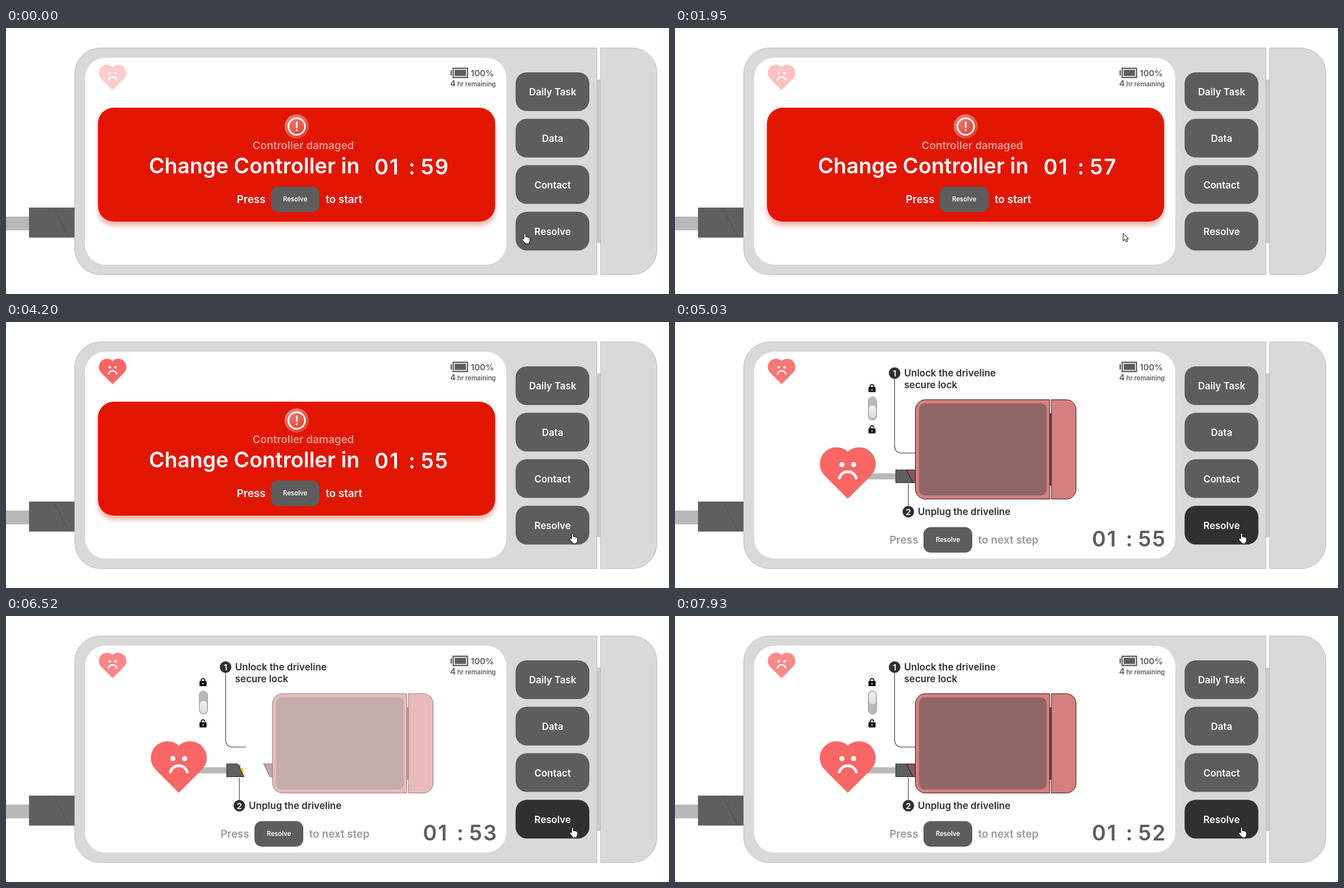
An HTML page that plays this animation: 1182x474 px, repeating every 7.99 s.

```html
<!DOCTYPE html>
<html lang="en">
<head>
<meta charset="utf-8">
<title>Controller alert</title>
<style>
html, body { margin: 0; width: 100%; height: 100%; overflow: hidden; background: #fff; }
svg { display: block; width: 1182px; height: 474px; font-family: Inter, "Liberation Sans", sans-serif; font-weight: 600; }
.mid { text-anchor: middle; }
.s11 { font-size: 11.3px; }
.s15 { font-size: 15.1px; }
.s17 { font-size: 17px; }
.s19 { font-size: 18.9px; }
.s38 { font-size: 37.8px; }
.clock text { font-size: 37.8px; letter-spacing: 1.9px; }
.white { fill: #fff; }
.gray { fill: #5d5d5d; }
.soft { fill: #9a9a9a; }
.ink { fill: #2f2f2f; }
.body { fill: #d9d9d9; stroke: #bcbcbc; }
.line { fill: none; stroke: #333; stroke-width: 1.1; }
.case { fill: #d67f7f; stroke: #231818; }
</style>
</head>
<body>
<svg viewBox="0 0 1182 474">
  <defs>
    <filter id="shadow" x="-5%" y="-10%" width="110%" height="125%">
      <feDropShadow dx="0" dy="7" stdDeviation="4" flood-color="#e11900" flood-opacity=".35"/>
    </filter>
    <linearGradient id="glow" x1="0" y1="0" x2=".8" y2="1">
      <stop offset="0" stop-color="#fff" stop-opacity=".5"/>
      <stop offset="1" stop-color="#fff" stop-opacity=".15"/>
    </linearGradient>
    <linearGradient id="knobFill" x1="0" y1="0" x2="0" y2="1">
      <stop offset="0" stop-color="#f1f1f1"/>
      <stop offset="1" stop-color="#dedede"/>
    </linearGradient>
    <g id="face">
      <path d="M0 91L-40.3 50.7A29.7 29.7 0 0 1 0 7A29.7 29.7 0 0 1 40.3 50.7Z" fill="#f96666"/>
      <circle cx="-10.5" cy="30" r="4.6" fill="#fff"/>
      <circle cx="10.5" cy="30" r="4.6" fill="#fff"/>
      <path d="M-15 54C-10 39 10 39 15 54" fill="none" stroke="#fff" stroke-width="5" stroke-linecap="round"/>
    </g>
    <g id="pill">
      <rect width="87" height="45.5" rx="13" fill="#5d5d5d"/>
      <text class="mid white s11" x="43.5" y="26.5">Resolve</text>
    </g>
  </defs>

  <rect y="336" width="42" height="24.5" fill="#b8b8b8"/>
  <rect x="41" y="320" width="83" height="53.5" fill="#5f5f5f"/>
  <path d="M85 320L112 373.5" stroke="#505050"/>
  <rect x="1053" y="92.500" width="7" height="290" fill="#cbcbcb" stroke="#bcbcbc"/>
  <path class="body" d="M1053.500 35.500H168.500A46 46 0 0 0 122.500 81.500V393.500A46 46 0 0 0 168.500 439.500H1053.500Z"/>
  <path class="body" d="M1060 35.500H1116A44.500 44.500 0 0 1 1160.500 80V395A44.500 44.500 0 0 1 1116 439.500H1060Z"/>
  <rect x="141" y="53" width="751" height="368.500" rx="36" fill="#fff"/>

  <g id="buttons"></g>

  <g class="gray">
    <rect x="792.500" y="75.500" width="2.500" height="9"/>
    <rect x="797.300" y="71.800" width="25.400" height="16.400" fill="none" stroke="#5d5d5d" stroke-width="2.300"/>
    <rect x="800" y="74.500" width="20" height="11"/>
    <text class="s15" x="828.500" y="85.500">100%</text>
    <text class="s15" x="791.800" y="103.500">4</text>
    <text class="s11" x="804.500" y="103.500">hr remaining</text>
  </g>

  <use id="pulse" href="#face" transform="translate(190 66) scale(.492)"/>

  <g id="alert">
    <rect x="164" y="142" width="708" height="203" rx="28" fill="#e11900" filter="url(#shadow)"/>
    <circle cx="518.300" cy="175.500" r="21.700" fill="url(#glow)"/>
    <circle cx="518.300" cy="175.500" r="14.800" fill="none" stroke="#fff" stroke-width="3"/>
    <path d="M518.300 168V177" stroke="#fff" stroke-width="3" stroke-linecap="round"/>
    <circle cx="518.300" cy="182" r="1.800" fill="#fff"/>
    <g class="white">
      <text class="mid s19" x="530" y="216" opacity=".58">Controller damaged</text>
      <text class="mid s38" x="442.500" y="259">Change Controller in</text>
      <g class="clock" id="clock1"></g>
      <text class="mid s19" x="437" y="312">Press</text>
      <text class="mid s19" x="602.500" y="312">to start</text>
    </g>
    <use href="#pill" x="472" y="282.500"/>
  </g>

  <g id="guide">
    <rect x="343" y="269.500" width="51" height="11" fill="#b8b8b8"/>
    <use href="#face" transform="translate(308 224)"/>
    <rect x="412" y="265" width="6" height="18" fill="#8b8b8b"/>
    <rect x="416" y="271" width="7" height="10" fill="#ffc800"/>
    <path d="M393.500 263.500H413L424.500 286.500H393.500Z" fill="#5f5f5f" stroke="#333"/>
    <path class="line" d="M391.500 100V219Q391.500 233.500 404 233.500H428M416 288.500V330"/>
    <g id="device">
      <path d="M412.500 263.500H428.500V286.500H424Z" fill="#85595a" stroke="#231818"/>
      <rect x="668.500" y="163.500" width="2.500" height="127.500" fill="#a86262" stroke="#231818"/>
      <path class="case" d="M668 138.500H446.500A18 18 0 0 0 428.500 156.500V297.500A18 18 0 0 0 446.500 315.500H668Z"/>
      <path class="case" d="M671 138.500H697.500A17.500 17.500 0 0 1 715 156V298A17.500 17.500 0 0 1 697.500 315.500H671Z"/>
      <rect x="435" y="145" width="227.500" height="164" rx="10" fill="#8f6666"/>
    </g>
    <g class="ink">
      <circle cx="391.500" cy="91" r="10.300"/>
      <circle cx="416" cy="338" r="10.300"/>
      <text class="s17" x="408.500" y="97">Unlock the driveline</text>
      <text class="s17" x="408.500" y="117.500">secure lock</text>
      <text class="s17" x="433" y="343.500">Unplug the driveline</text>
    </g>
    <g class="mid white s15">
      <text x="391.500" y="96.500">1</text>
      <text x="416" y="343.500">2</text>
    </g>
    <g id="locks"></g>
    <rect x="344.500" y="133.500" width="15" height="41.500" rx="7.500" fill="#b9b9b9" stroke="#a2a2a2"/>
    <rect id="knob" x="345.200" y="134.500" width="13.600" height="23.500" rx="6.800" fill="url(#knobFill)" stroke="#aaa" stroke-width=".8"/>
    <g class="soft">
      <text class="mid s19" x="408" y="395">Press</text>
      <text class="mid s19" x="594.300" y="395">to next step</text>
    </g>
    <use href="#pill" x="443" y="365.500"/>
    <g class="clock gray" id="clock2"></g>
  </g>

  <g id="cursor" stroke="#000" fill="#fff" stroke-linejoin="round">
    <path id="arrow" d="M0 .5V14L3.300 11 5.700 16 8 15 5.700 10.200H9.500Z"/>
    <path id="hand" d="M-1.600 10V1.600Q-1.600 0 0 0T1.600 1.600V6.200Q3.300 5.200 4.300 6.800Q6 6 6.800 7.600Q9 7.200 9 9.500V12.500Q9 15 7.500 16.500V18.500H.2V17Q-2.500 14.500-5 10.800Q-5 8.800-3.300 9Z"/>
  </g>
</svg>
<script>
const LOOP = 7990;
const NS = "http://www.w3.org/2000/svg";
const $ = id => document.getElementById(id);

function add(parent, tag, attrs, text) {
  const el = document.createElementNS(NS, tag);
  for (const k in attrs) el.setAttribute(k, attrs[k]);
  if (text) el.textContent = text;
  parent.appendChild(el);
  return el;
}

const buttons = ["Daily Task", "Data", "Contact", "Resolve"].map((label, i) => {
  const y = 79 + i * 82.8;
  const box = add($("buttons"), "rect", { x: 908.5, y, width: 131.5, height: 69, rx: 20, fill: "#5d5d5d" });
  add($("buttons"), "text", { class: "mid white s17", x: 974.5, y: y + 41.3 }, label);
  return box;
});

// Closed lock above the switch, open lock below
[[111, 0], [184.5, 1]].forEach(([y, open]) => {
  const g = add($("locks"), "g", { transform: `translate(345 ${y})` });
  add(g, "rect", { x: 0, y: 5, width: 12.5, height: 9, rx: 1 });
  add(g, "path", {
    d: `M3 6V3.600A3.200 3.200 0 0 1 9.400 3.600V${open ? 3.8 : 6}`,
    fill: "none", stroke: "#000", "stroke-width": 1.7
  });
  add(g, "rect", { x: 5.4, y: 8, width: 1.7, height: 3, fill: "#fff" });
});

function makeClock(id, x, y) {
  const g = $(id);
  add(g, "text", { x, y }, "01");
  add(g, "text", { x: x + 67.5, y, class: "mid" }, ":");
  return add(g, "text", { x: x + 82.5, y }, "59");
}
const sec1 = makeClock("clock1", 657, 261);
const sec2 = makeClock("clock2", 743.3, 400.3);

const clamp = p => Math.max(0, Math.min(1, p));
const smooth = p => (1 - Math.cos(Math.PI * p)) / 2;
const easeOut = p => 1 - (1 - p) ** 2;
const linear = p => p;
const span = (t, from, length, ease = easeOut) => ease(clamp((t - from) / length));

// Rows are [time, value, value, ...]
function track(rows, t, ease) {
  let i = 0;
  while (i < rows.length - 2 && t >= rows[i + 1][0]) i++;
  const a = rows[i], b = rows[i + 1];
  const p = span(t, a[0], b[0] - a[0], ease);
  return a.slice(1).map((v, k) => v + (b[k + 1] - v) * p);
}

const PULSE = [
  [70, .33], [900, 1], [1720, .33], [2830, 1], [3560, .33], [4200, 1],
  [4850, 1], [5550, .33], [6250, 1], [6950, .33], [7650, 1], [8350, .33]
];
const POINTER = [
  [1740, 925, 366], [1930, 799, 365.5], [2420, 799, 365.5],
  [2560, 850, 372], [2860, 1030, 390], [3200, 1010, 376.5]
];
const TICKS = [450, 1450, 2450, 3450, 5370, 6370, 7370];

function draw(t) {
  $("pulse").setAttribute("opacity", track(PULSE, t, smooth)[0]);

  const seconds = String(59 - TICKS.filter(k => t >= k).length);
  sec1.textContent = sec2.textContent = seconds;

  const swap = span(t, 4470, 230, linear);
  $("alert").setAttribute("opacity", 1 - swap);
  $("guide").setAttribute("opacity", swap);
  const shade = Math.round(93 - 45 * swap);
  buttons[3].setAttribute("fill", `rgb(${shade},${shade},${shade})`);

  const back = span(t, 7270, 300);
  const knob = 16 * span(t, 4850, 300) * (1 - back);
  $("knob").setAttribute("transform", `translate(0 ${knob})`);
  const shift = t < 7260 ? 46.5 * span(t, 5630, 300) : 0;
  $("device").setAttribute("transform", `translate(${shift} 0)`);
  $("device").setAttribute("opacity", t < 7260 ? 1 - span(t, 6440, 300) : back);

  const [x, y] = track(POINTER, t, smooth);
  const over = x > 908 && x < 1040 && y > 327 && y < 396;
  $("cursor").setAttribute("transform", `translate(${x} ${y})`);
  $("hand").setAttribute("visibility", over ? "visible" : "hidden");
  $("arrow").setAttribute("visibility", over ? "hidden" : "visible");
}

const start = performance.now();
function frame(now) {
  draw(Math.max(0, now - start) % LOOP);
  requestAnimationFrame(frame);
}
draw(0);
requestAnimationFrame(frame);
</script>
</body>
</html>
```
